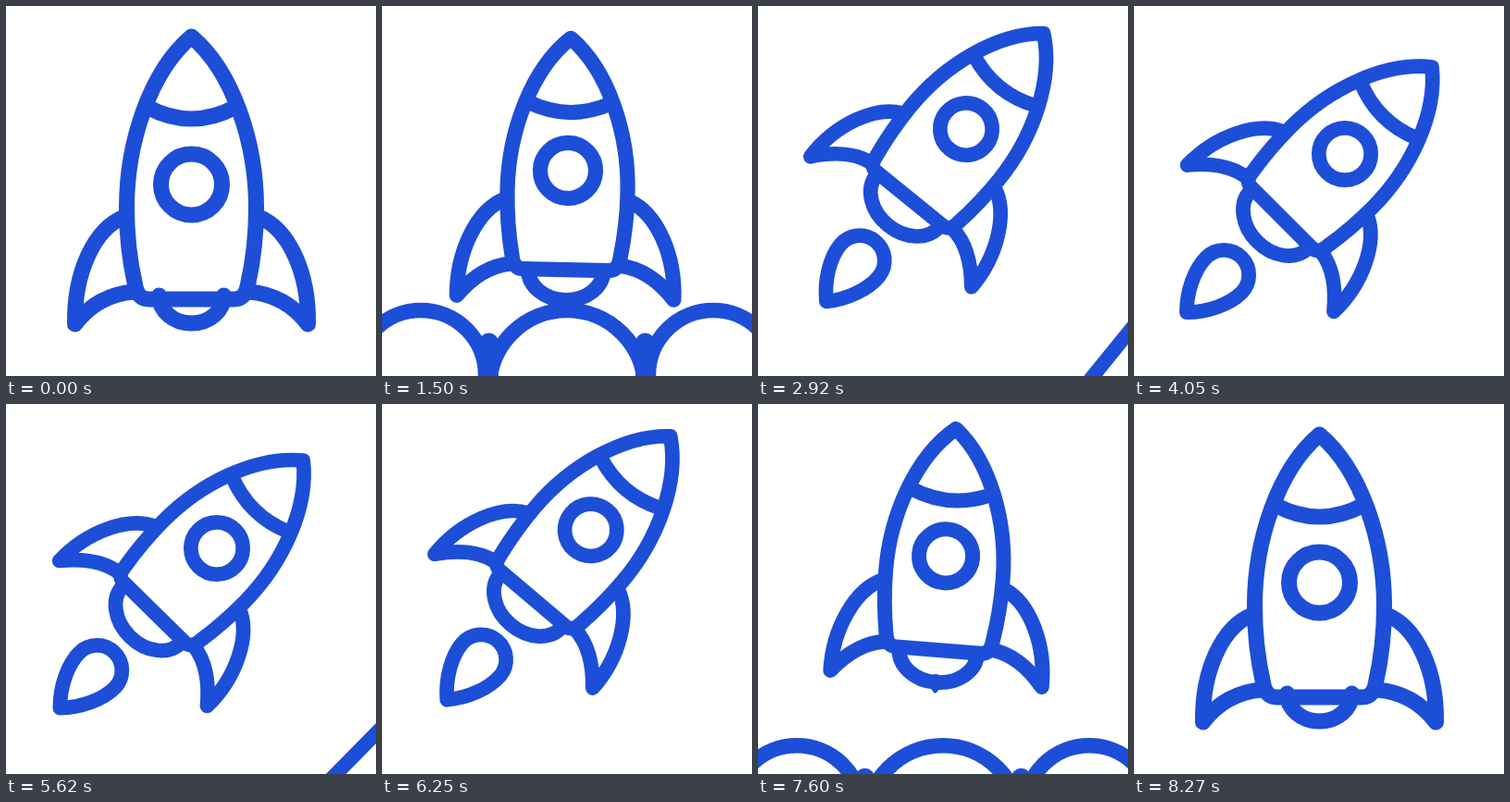
These frames come from a looping animation (400 by 400 pixels, 8.3 s). An HTML page:

```html
<!DOCTYPE html>
<html lang="en">
<head>
<meta charset="utf-8">
<title>Rocket launch</title>
<style>
  html, body { margin: 0; width: 100%; height: 100%; overflow: hidden; background: #fff; }
  svg { display: block; width: 100vw; height: 100vh; }
  path, circle, line { fill: none; stroke: #1d4ed8; stroke-linecap: round; stroke-linejoin: round; }
</style>
</head>
<body>
<svg viewBox="0 0 400 400">
  <g id="streaks" stroke-width="15.5"></g>
  <g id="rocket">
    <path id="flame" d="M0 242C-16 226 -27 203 -27 185A27 27 0 0 1 27 185C27 203 16 226 0 242Z"/>
    <path id="nozzle"/>
    <path id="finLeft"/>
    <path id="finRight" transform="scale(-1 1)"/>
    <path id="body"/>
    <path id="cone"/>
    <circle id="porthole"/>
  </g>
  <g id="clouds" stroke-width="16.5">
    <circle cx="42" cy="399" r="70"/>
    <circle cx="200" cy="413" r="84"/>
    <circle cx="358" cy="399" r="70"/>
    <path d="M115.500 364V560M284.500 364V560" stroke-width="21"/>
  </g>
</svg>
<script>
const LOOP = 8300, LAUNCH = 1020, RETURN_END = 8270, FLIGHT = 3030;
const $ = id => document.getElementById(id);

// time, x, y, angle, morph, flame scale, flame shift, cloud drop
const POSES = [
  [0,    200.5, 193, 0,    0,   0,  -60, 100],
  [480,  201,   178, 1.2,  .62, 0,  -60, 0],
  [900,  207.5, 146, 11.5, .96, .6, -30, 110],
  [1425, 218,   124, 28.3, 1,   1,  -7,  160],
  [1900, 225,   133, 39,   1,   1,  -2,  160],
  [2650, 228,   156, 44.5, 1,   1,  0,   160],
  [3030, 228,   160, 45,   1,   1,  0,   160]
];

// Each part upright and in flight, relative to the porthole
const SHAPES = {
  body: [
    'M0 -160C-45 -122 -70 -45 -70 25C-70 55 -66 86 -61 108Q-58.5 124 -46 124L46 124Q58.5 124 61 108C66 86 70 55 70 25C70 -45 45 -122 0 -160Z',
    'M0 -133C-40 -101 -62 -38 -62 20C-62 45 -60 65 -57 84Q-56 97 -46 97L46 97Q56 97 57 84C60 65 62 45 62 20C62 -38 40 -101 0 -133Z'
  ],
  cone: ['M-48 -84Q0 -58 48 -84', 'M-43 -67Q0 -49 43 -67'],
  fin: [
    'M-73 35C-105 48 -127 95 -126 151C-110 130 -88 118 -62 116',
    'M-64 30C-92 42 -113 85 -112 129C-98 112 -80 96 -57 93'
  ],
  nozzle: ['M-35 120A35 30 0 0 0 35 120', 'M-44 100A44 34 0 0 0 44 100']
};

// Streaks passing beside the rocket: sideways offset, moment of passing
const STREAKS = [[-168, 1425], [252, 1890], [-168, 2150], [252, 2650], [-168, 2850]];
const STREAK_HALF = 200, STREAK_SPEED = 3;

const streakLines = STREAKS.map(([x]) => {
  const line = document.createElementNS('http://www.w3.org/2000/svg', 'line');
  line.setAttribute('x1', x);
  line.setAttribute('x2', x);
  return $('streaks').appendChild(line);
});

const lerp = (a, b, k) => a + (b - a) * k;

function mixPath([from, to], k) {
  const ends = to.match(/-?[\d.]+/g);
  let i = 0;
  return from.replace(/-?[\d.]+/g, n => +lerp(+n, +ends[i++], k).toFixed(3));
}

function slope(i, c) {
  const a = POSES[i], b = POSES[i + 1];
  return (b[c] - a[c]) / (b[0] - a[0]);
}

function tangent(i, c) {
  if (i === 0 || i === POSES.length - 1) return 0;
  const p = slope(i - 1, c), q = slope(i, c);
  return p * q > 0 ? 2 * p * q / (p + q) : 0;
}

// Monotone cubic interpolation through the poses
function poseAt(t) {
  let i = 0;
  while (i < POSES.length - 2 && t > POSES[i + 1][0]) i++;
  const a = POSES[i], b = POSES[i + 1], span = b[0] - a[0], u = (t - a[0]) / span;
  const ease = u * u * (3 - 2 * u);
  return a.slice(1).map((start, j) => {
    const c = j + 1;
    return lerp(start, b[c], ease) +
      span * u * (1 - u) * (tangent(i, c) * (1 - u) - tangent(i + 1, c) * u);
  });
}

function draw(t) {
  const [x, y, angle, morph, flameScale, flameShift, cloudDrop] = poseAt(t);
  $('rocket').setAttribute('transform', `translate(${x} ${y}) rotate(${angle})`);
  $('rocket').setAttribute('stroke-width', lerp(17, 15.7, morph));
  for (const id of ['body', 'cone', 'nozzle']) $(id).setAttribute('d', mixPath(SHAPES[id], morph));
  const fin = mixPath(SHAPES.fin, morph);
  $('finLeft').setAttribute('d', fin);
  $('finRight').setAttribute('d', fin);
  $('porthole').setAttribute('r', lerp(33, 28.2, morph));

  $('flame').setAttribute('transform',
    `translate(0 ${185 + flameShift}) scale(${flameScale}) translate(0 -185)`);
  $('flame').style.display = flameScale > .01 ? '' : 'none';
  $('clouds').setAttribute('transform', `translate(0 ${cloudDrop})`);

  $('streaks').setAttribute('transform', `translate(200 200) rotate(${angle})`);
  streakLines.forEach((line, i) => {
    const middle = (t - STREAKS[i][1]) * STREAK_SPEED;
    line.setAttribute('y1', middle - STREAK_HALF);
    line.setAttribute('y2', middle + STREAK_HALF);
  });
}

const startTime = performance.now();
function tick() {
  const time = (performance.now() - startTime) % LOOP;
  draw(Math.max(0, Math.min(time - LAUNCH, RETURN_END - time, FLIGHT)));
  requestAnimationFrame(tick);
}
tick();
</script>
</body>
</html>
```
